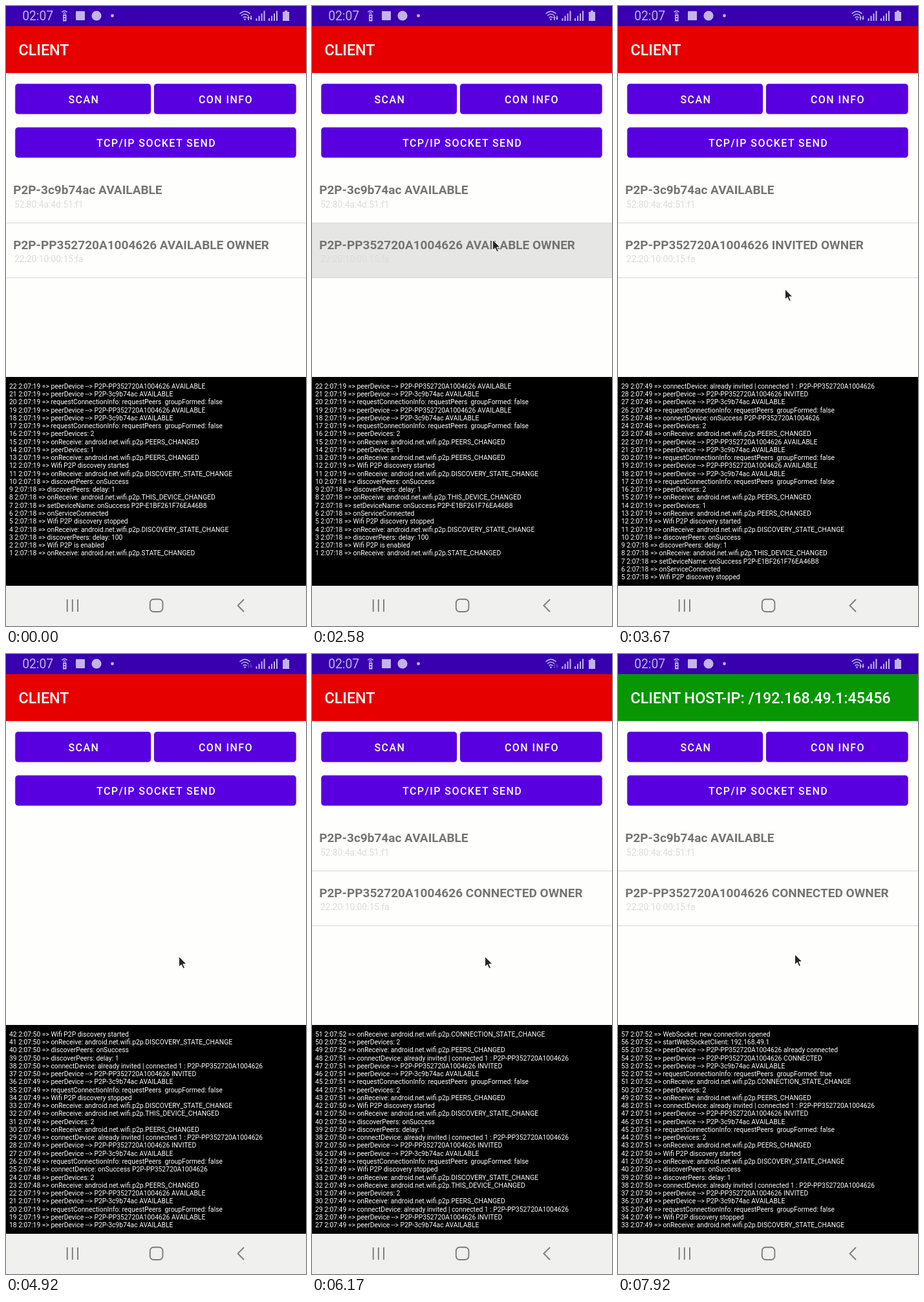
An HTML page for the animation above (8000 ms loop, 464 by 956 pixels).

```html
<!DOCTYPE html>
<html lang="en">
<head>
<meta charset="utf-8">
<title>Wifi P2P client</title>
<style>
  html, body { margin: 0; height: 100%; overflow: hidden; background: #fff; }
  svg { display: block; width: 464px; height: 956px; font-family: Roboto, sans-serif; }
  text { white-space: pre; }
  .title { font-size: 23.3px; font-weight: 500; fill: #fff; }
  .button rect { fill: #5800e0; stroke: #5800e0; stroke-opacity: .25; }
  .button text { font-size: 16px; font-weight: 500; letter-spacing: 1.43px; fill: #fff; }
  .name { font-size: 19px; font-weight: 700; fill: #747474; }
  .address { font-size: 13.8px; fill: #dcdcdc; }
  #log text { font-size: 10.33px; fill: #fff; }
  .line { fill: none; stroke-width: 1.5; }
</style>
</head>
<body>
<svg viewBox="0 0 464 956">
  <rect width="464" height="956" fill="#fefefd"/>
  <rect width="464" height="31" fill="#3800ae"/>
  <rect id="header" y="31" width="464" height="72.5"/>
  <text id="title" class="title" x="19.5" y="76.3"></text>

  <g fill="#c3b3ec" stroke="#c3b3ec" stroke-width="0">
    <text x="25.2" y="22" font-size="19.3">02:07</text>
    <path class="line" d="M86.5 9.5Q90.5 5.5 94.5 9.5M88.5 11.5Q90.5 9.5 92.5 11.5"/>
    <path fill-rule="evenodd" d="M88 13h5.5v10.5H88zM89.6 15v2h2.2v-2zM89.6 19v2h2.2v-2z"/>
    <rect x="108" y="8" width="14" height="14" rx="1"/>
    <circle cx="140" cy="15" r="7.6"/>
    <circle cx="164.5" cy="15" r="2.4"/>
    <path class="line" d="M361.5 12Q369.5 4.5 377.5 12M364 15Q369.5 10 375 15M366.5 18Q369.5 15.5 372.5 18"/>
    <path d="M367.5 19.5h4l-2 3z"/>
    <path id="up" d="M373 18.5l2-3.5 2 3.5h-1.2v3.5h-1.6v-3.5z"/>
    <path id="down" d="M377 18.5l2 3.5 2-3.5h-1.2V15h-1.6v3.5z"/>
    <path id="bars" class="line" style="stroke-width:2"/>
    <path d="M428 9h3V7h4v2h3v14h-10z"/>
  </g>

  <g id="buttons"></g>
  <g id="list">
    <path d="M0 334.5H464M0 419H464" stroke="#dadada" stroke-width="1.2"/>
    <rect id="ripple" y="335" width="464" height="84"/>
    <text class="name" x="11.2" y="289.8">P2P-3c9b74ac AVAILABLE</text>
    <text class="address" x="13" y="310.9">52:80:4a:4d:51:f1</text>
    <text id="owner" class="name" x="11.2" y="374.6"></text>
    <text class="address" x="13" y="395.4">22:20:10:00:15:fa</text>
  </g>

  <rect y="572" width="464" height="322"/>
  <g id="log"></g>

  <rect y="894" width="464" height="62" fill="#f0f0ef"/>
  <g fill="none" stroke="#7c7c7c" stroke-width="1.9">
    <path d="M94.7 915V934M102.8 915V934M111 915V934M368 915L358.5 924.5L368 934"/>
    <rect x="222.8" y="914.8" width="19.6" height="19.2" rx="5.5"/>
  </g>
  <path id="cursor" d="M0 0V16L3.7 12.6L6.5 18.6L9 17.5L6.4 11.6H11.5Z" fill="#262626" stroke="#fff"/>
</svg>
<script>
// All times below are ticks of the screen's 12 updates per second.
const FPS = 12, LOOP = 8 * FPS, ROWS = 25;
const $ = id => document.getElementById(id);

const BIG = 'P2P-PP352720A1004626', SMALL = 'P2P-3c9b74ac';
const receive = what => `onReceive: android.net.wifi.p2p.${what}`;
const peer = (name, state) => `peerDevice --> ${name} ${state}`;
const info = (formed = false) => [
  `requestConnectionInfo: requestPeers  groupFormed: ${formed}`, peer(SMALL, 'AVAILABLE')];
const peers = count => [receive('PEERS_CHANGED'), `peerDevices: ${count}`];
const discovery = state => [receive('DISCOVERY_STATE_CHANGE'), `Wifi P2P discovery ${state}`];
const discover = delay => `discoverPeers: delay: ${delay}`;
const found = 'discoverPeers: onSuccess';
const available = [...info(), peer(BIG, 'AVAILABLE')];
const invited = [peer(BIG, 'INVITED'), `connectDevice: already invited | connected 1 : ${BIG}`];

const entries = [];
function log(tick, second, ...messages) {
  for (const message of messages)
    entries.push({ tick, text: `${entries.length + 1} 2:07:${second} => ${message}` });
}
log(0, 18, receive('STATE_CHANGED'), 'Wifi P2P is enabled', discover(100), ...discovery('stopped'),
  'onServiceConnected', 'setDeviceName: onSuccess P2P-E1BF261F76EA46B8',
  receive('THIS_DEVICE_CHANGED'), discover(1), found);
log(0, 19, ...discovery('started'), ...peers(1), ...peers(2), ...available, ...available);
log(33, 48, ...peers(2));
log(34, 48, `connectDevice: onSuccess ${BIG}`);
log(35, 49, ...info(), ...invited);
log(46, 49, ...peers(2), receive('THIS_DEVICE_CHANGED'), ...discovery('stopped'), ...info());
log(47, 50, ...invited, discover(1), found, ...discovery('started'));
log(61, 51, ...peers(2));
log(62, 51, ...info(), ...invited);
log(74, 52, ...peers(2), receive('CONNECTION_STATE_CHANGE'));
log(76, 52, ...info(true), peer(BIG, 'CONNECTED'), peer(BIG, 'already connected'),
  'startWebSocketClient: 192.168.49.1');
log(77, 52, 'WebSocket: new connection opened');

// Each move is a quadratic curve that starts where the previous one ended.
const moves = [
  { start: 7, end: 12, bend: [368, 375], to: [315, 346] },
  { start: 13, end: 17, bend: [296, 351], to: [279.5, 360.5] },
  { start: 41, end: 47, bend: [244, 460], to: [266, 466] },
  { start: 51, end: 52, bend: [267, 466], to: [267.5, 466.5] },
  { start: 93, end: 95, bend: [270, 464], to: [273.5, 463] }];

function cursorAt(tick) {
  let point = [448, 425];
  for (const { start, end, bend, to } of moves) {
    const u = Math.min(1, Math.max(0, (tick - start) / (end - start))), v = 1 - u;
    point = point.map((p, i) => v * v * p + 2 * u * v * bend[i] + u * u * to[i]);
  }
  return point;
}

function add(parent, tag, attributes, text = '') {
  const node = document.createElementNS('http://www.w3.org/2000/svg', tag);
  for (const key in attributes) node.setAttribute(key, attributes[key]);
  node.textContent = text;
  return parent.appendChild(node);
}

function addButton(x, y, width, label) {
  const group = add($('buttons'), 'g', { class: 'button' });
  add(group, 'rect', { x, y, width, height: 46.6, rx: 4.5 });
  add(group, 'text', { x: x + width / 2 + 1.2, y: y + 30, 'text-anchor': 'middle' }, label);
}
addButton(14.3, 120, 209.7, 'SCAN');
addButton(229, 120, 219.6, 'CON INFO');
addButton(14.3, 187.2, 434.3, 'TCP/IP SOCKET SEND');

let bars = '';
for (const x of [387.5, 407])
  for (let i = 0; i < 4; i++) bars += `M${x + i * 4} 23v${-4 - i * 3.8}`;
$('bars').setAttribute('d', bars);

const rows = Array.from({ length: ROWS }, (_, i) =>
  add($('log'), 'text', { x: 5, y: 589.7 + i * 12.27 }));

function render(tick) {
  const newest = entries.filter(entry => entry.tick <= tick).reverse();
  rows.forEach((row, i) => row.textContent = newest[i]?.text ?? '');

  const state = tick >= 74 ? 'CONNECTED' : tick >= 33 ? 'INVITED' : 'AVAILABLE';
  $('owner').textContent = `${BIG} ${state} OWNER`;
  $('list').style.display = tick >= 46 && tick < 61 ? 'none' : '';
  $('ripple').style.opacity = tick >= 30 && tick < 34 ? .1 * Math.sin(Math.PI * (tick - 29) / 5) : 0;

  const online = tick >= 77;
  $('header').style.fill = online ? '#089604' : '#e60000';
  $('title').textContent = online ? 'CLIENT HOST-IP: /192.168.49.1:45456' : 'CLIENT';

  $('up').style.opacity = tick >= 59 && tick < 81 ? .3 : 1;
  $('down').style.opacity = tick >= 59 && tick < 76 ? .3 : 1;

  $('cursor').style.display = tick < 8 ? 'none' : '';
  $('cursor').setAttribute('transform', `translate(${cursorAt(tick)})`);
}

let shown = -1;
function draw() {
  // The 5 ms lead absorbs rounding of the tick times.
  const tick = Math.floor((performance.now() + 5) * FPS / 1000) % LOOP;
  if (tick !== shown) render(shown = tick);
  requestAnimationFrame(draw);
}
draw();
</script>
</body>
</html>
```
